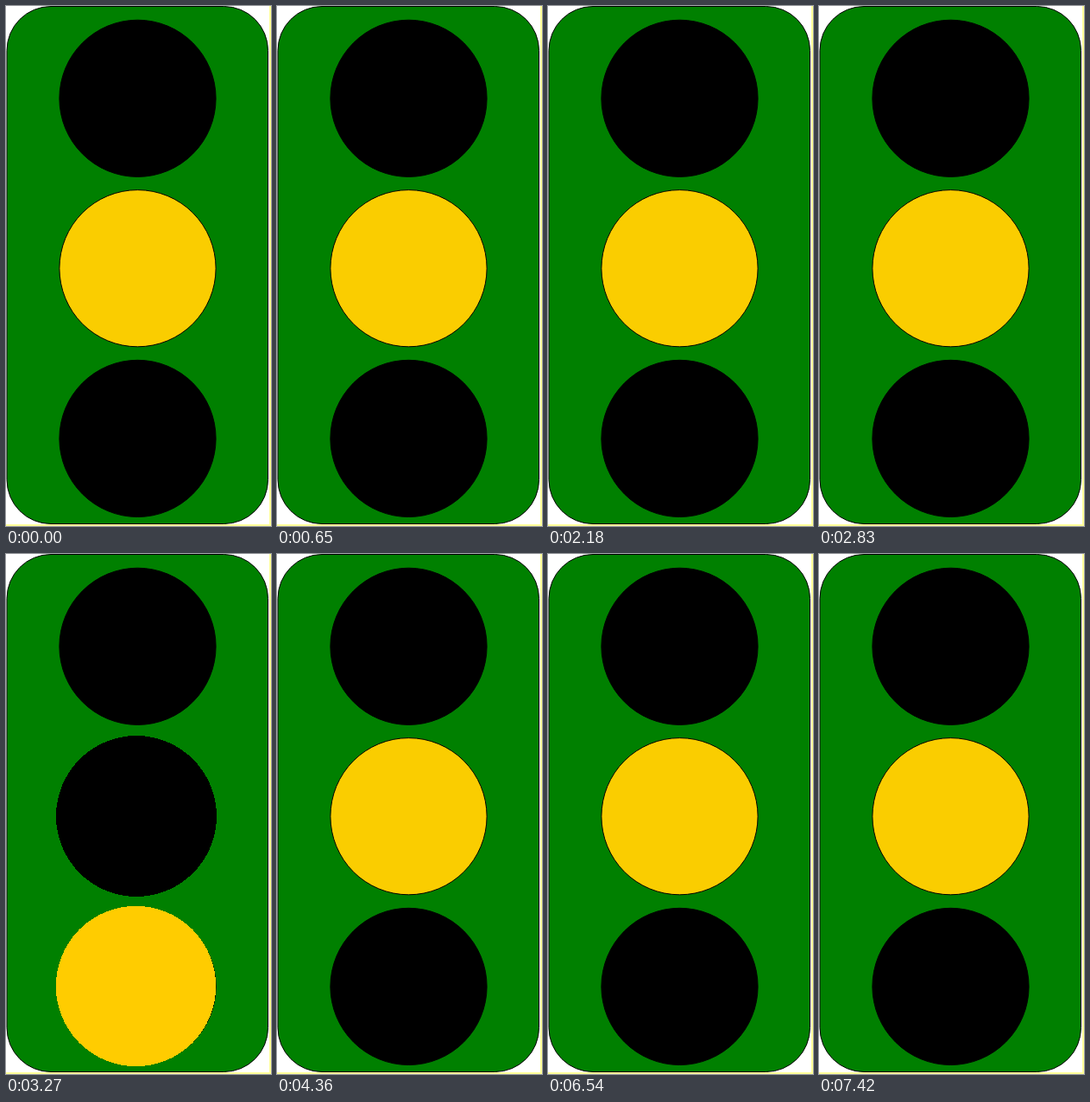
An HTML page that plays this animation: 307x601 px, repeating every 8 s.

```html
<!DOCTYPE html>
<html lang="en">
<head>
<meta charset="utf-8">
<title>Traffic light</title>
<style>
  html, body { margin: 0; width: 100%; height: 100%; overflow: hidden; background: #fff; }
  svg { display: block; width: 307px; height: 601px; }
</style>
</head>
<body>
<svg viewBox="0 0 307 601">
  <path d="M306 0V600H0" fill="none" stroke="#ffff99" stroke-width="2"/>
  <rect x="1" y=".5" width="302.5" height="598" rx="51" fill="#008000" stroke="#000"/>
  <g stroke="#000">
    <circle cx="152.5" cy="106.8" r="90.6"/>
    <circle cx="152.5" cy="303.2" r="90.6" fill="#facd00"/>
    <circle cx="152.5" cy="499.9" r="90.6"/>
  </g>
  <g id="low" shape-rendering="crispEdges">
    <circle cx="151" cy="303" r="93"/>
    <circle cx="150.5" cy="499.5" r="92.7" fill="#ffcc00"/>
  </g>
</svg>
<script>
  const LOOP = 8000, STEP = 1090, LAST = 6;
  const low = document.getElementById('low');

  // The lamps alternate on each step; the last step holds until the loop ends.
  function draw() {
    const step = Math.min(LAST, Math.floor(performance.now() % LOOP / STEP));
    low.style.display = step % 2 ? '' : 'none';
    requestAnimationFrame(draw);
  }
  draw();
</script>
</body>
</html>
```
